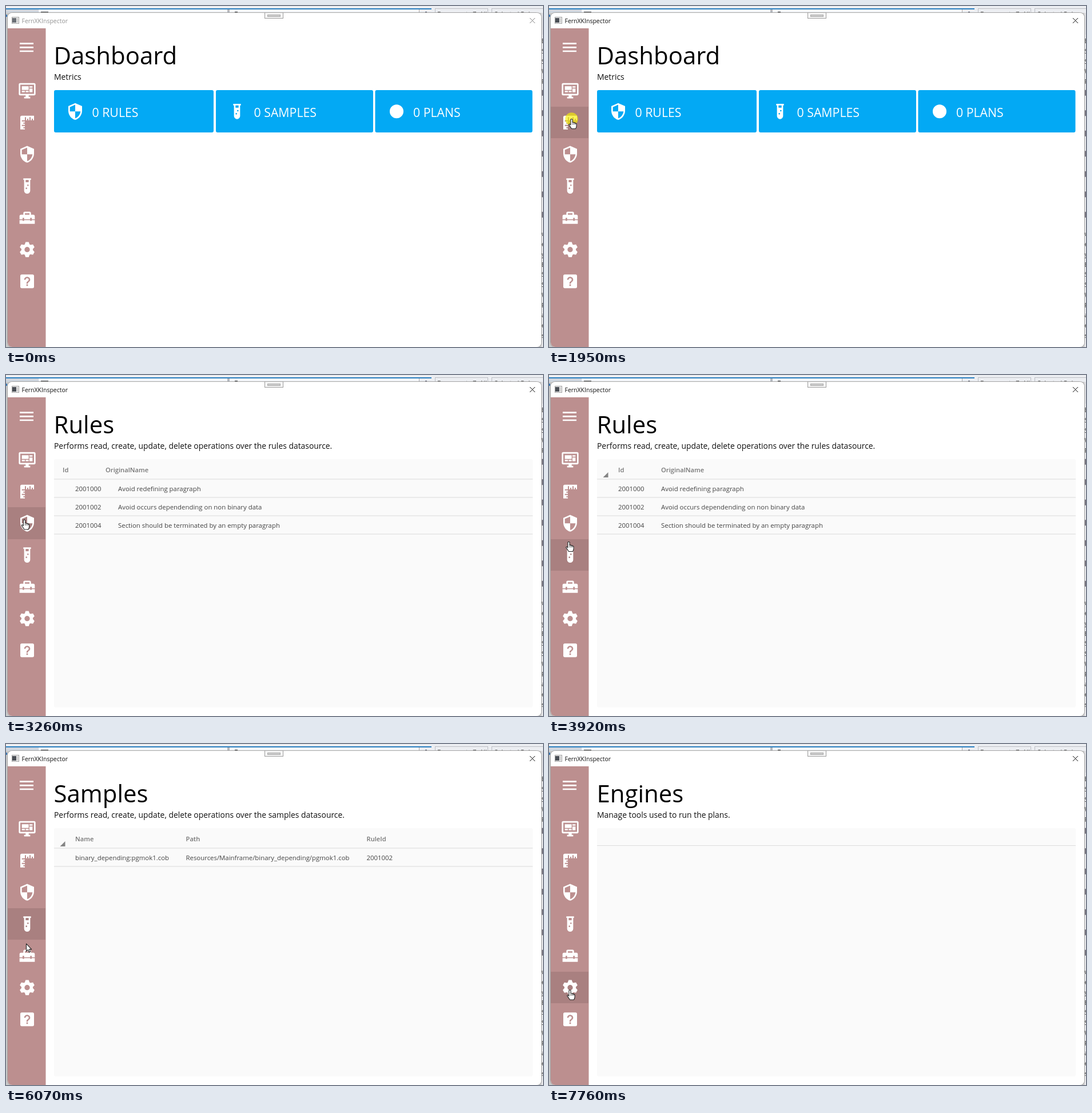
An HTML page with a canvas that plays this animation: 939x596 px, repeating every 8 s.

```html
<!DOCTYPE html>
<html lang="en">
<head>
<meta charset="utf-8">
<title>Dashboard</title>
<style>
html, body { margin: 0; width: 100%; height: 100%; overflow: hidden; background: #fff; }
canvas { display: block; width: 939px; height: 596px; }
</style>
</head>
<body>
<canvas id="stage" width="939" height="596"></canvas>
<script>
const ctx = document.getElementById('stage').getContext('2d');
const LOOP = 8000;
const STEP = 72.4;
const FONT = '"Open Sans", "Noto Sans", sans-serif';
const ROSE = '#bc8f8f', BLUE = '#03a9f4';

// Icons on a 24-unit grid, filled even-odd
const icon = {
  menu: new Path2D('M3,6H21V8H3ZM3,11H21V13H3ZM3,16H21V18H3Z'),
  monitor: new Path2D('M21,16V4H3V16H21M21,2A2,2 0 0,1 23,4V16A2,2 0 0,1 21,18H14V20H16V22H8V20H10V18H3A2,2 0 0,1 1,16V4A2,2 0 0,1 3,2H21M5,6H14V11H5ZM15,6H19V8H15ZM15,9H19V14H15ZM5,12H9V14H5ZM10,12H14V14H10Z'),
  ruler: new Path2D('M3,5V21H9V19.5H7V18H9V16.5H5V15H9V13.5H7V12H9V10.5H5V9H9V5H10.5V9H12V7H13.5V9H15V5H16.5V9H18V7H19.5V9H21V3H5A2,2 0 0,0 3,5'),
  shield: new Path2D('M12,12H19C18.47,16.11 15.72,19.78 12,20.92V12H5V6.3L12,3.19M12,1L3,5V11C3,16.55 6.84,21.73 12,23C17.16,21.73 21,16.55 21,11V5Z'),
  tube: new Path2D('M7,2V4H8V18A4,4 0 0,0 16,18V4H17V2ZM10,15A1,1 0 0,1 12,15A1,1 0 0,1 10,15M12,11A1,1 0 0,1 14,11A1,1 0 0,1 12,11M14,7H10V4H14Z'),
  toolbox: new Path2D('M18,16H16V15H8V16H6V15H2V20H22V15H18ZM20,8H17V6A2,2 0 0,0 15,4H9A2,2 0 0,0 7,6V8H4A2,2 0 0,0 2,10V14H6V12H8V14H16V12H18V14H22V10A2,2 0 0,0 20,8M15,8H9V6H15Z'),
  gear: gearPath(),
  help: new Path2D('M11,18H13V16H11ZM12,6A4,4 0 0,0 8,10H10A2,2 0 0,1 14,10C14,12 11,11.75 11,15H13C13,12.75 16,12.5 16,10A4,4 0 0,0 12,6M5,3H19A2,2 0 0,1 21,5V19A2,2 0 0,1 19,21H5A2,2 0 0,1 3,19V5A2,2 0 0,1 5,3'),
  dot: new Path2D('M3,12A9,9 0 0,1 21,12A9,9 0 0,1 3,12Z')
};
const handPath = new Path2D('M-1.6,1Q0,-1 1.6,1V6Q3.2,5.2 4.2,6.6Q5.6,6 6.6,7.4Q8.6,7.2 8.6,9.2V12Q8.6,14.5 7,17H0Q-2,13.5 -4.4,10.6Q-5,8.4 -3,9L-1.6,10.4Z');
const arrowPath = new Path2D('M0,0V13.2L3,10.5L5,15L7.2,14L5.2,9.8H9.2Z');

const MENU = ['monitor', 'ruler', 'shield', 'tube', 'toolbox', 'gear', 'help'];
const itemTop = i => Math.round(120.4 + 55.45 * i);

// time, x, y of the pointer's hot spot
const PATH = [
  [70, 858, 584], [240, 640, 505], [430, 379, 388], [500, 323, 357], [860, 80, 225],
  [1150, 50, 208], [1235, 50, 208], [1590, 40, 199], [1680, 40, 199], [1730, 39.5, 197.5],
  [2250, 39.5, 197.5], [2750, 32, 253], [3550, 32, 253], [4130, 36, 315],
  [5650, 36, 315], [6081, 35.5, 349], [6290, 31, 378], [6375, 31, 378], [6660, 39.5, 370],
  [7170, 39.5, 370], [7600, 27, 434], [7745, 36.5, 430]
];
const HOVER = [[990, 1], [2500, 2], [3800, 3], [6110, 4], [7400, 5]];
const PAGES = [[0, dashboard], [2010, plans], [3170, () => rules(false)], [3320, () => rules(true)],
  [5270, () => samples(false)], [5340, () => samples(true)], [7010, engines]];
const PRESSES = [1880, 2960, 5060, 6880], PRESS_TIME = 145;
const RIPPLES = [[2020, 1], [3335, 2], [5440, 3], [6995, 4]], RIPPLE_TIME = 135;

function gearPath() {
  const p = new Path2D();
  const corners = [[-25, 7.5], [-11.5, 10.15], [11.5, 10.15], [25, 7.5]];
  for (let k = 0; k < 6; k++) {
    for (const [deg, r] of corners) {
      const a = (deg + 60 * k) * Math.PI / 180;
      p.lineTo(12 + r * Math.sin(a), 12 - r * Math.cos(a));
    }
  }
  p.closePath();
  p.moveTo(15.5, 12);
  p.arc(12, 12, 3.5, 0, 7);
  return p;
}

const latest = (list, t) => list.filter(e => e[0] <= t).pop();

function rect(x, y, w, h, color) {
  ctx.fillStyle = color;
  ctx.fillRect(x, y, w, h);
}

function rounded(x, y, w, h, r, color) {
  ctx.fillStyle = color;
  ctx.beginPath();
  ctx.roundRect(x, y, w, h, r);
  ctx.fill();
}

function text(s, x, y, size, color, weight = 400) {
  ctx.font = `${weight} ${size}px ${FONT}`;
  ctx.fillStyle = color;
  ctx.fillText(s, x, y);
}

function drawIcon(name, cx, cy) {
  ctx.save();
  ctx.translate(cx - 16, cy - 16);
  ctx.scale(4 / 3, 4 / 3);
  ctx.fillStyle = '#fff';
  ctx.fill(icon[name], 'evenodd');
  ctx.restore();
}

function desktop() {
  rect(0, 0, 939, 596, '#c9c9c9');
  rect(0, 0, 939, 12, '#eceef2');
  rect(0, 4, 744, 2, '#2b7fc0');
  rect(0, 6, 57, 6, '#cfd6df');
  rect(58, 6, 329, 6, '#f5f6f8');
  rect(61, 10, 13, 2, '#444');
  rect(387, 6, 4, 6, '#b4b8be');
  rect(391, 6, 331, 6, '#f5f6f8');
  rect(400, 10, 5, 2, '#333');
  rect(722, 6, 1, 6, '#aaa');
  rect(733, 10, 3, 2, '#556');
  ctx.strokeStyle = '#bcbec4';
  ctx.lineWidth = 1;
  ctx.strokeRect(750.5, 4.5, 92, 20);
  ctx.strokeRect(849.5, 4.5, 100, 20);
  text('Document   7  All', 754, 18, 11, '#444');
  text('Selected Rules', 854, 18, 11, '#444');
  rect(0, 15, 2, 4, '#3b78b5');
  rect(936, 12, 3, 584, '#dedee2');
  rect(938, 50, 1, 546, '#f4f4f4');
  for (let i = 0; i < 30; i++) {
    const y = 65 + i * 17.75;
    if (y < 140 || y > 390) text('ESSWPaeswey'[i % 11], 936.5, y, 11, '#333');
    else if (i % 2) rect(937, y - 7, 2, 10, '#77747f');
  }
}

function chrome(active) {
  ctx.strokeStyle = '#a4a4a4';
  ctx.lineWidth = 1;
  ctx.beginPath();
  ctx.roundRect(2.5, 11.5, 934, 585, 8);
  ctx.stroke();
  rounded(3, 12, 933, 584, 8, '#fff');
  rounded(3, 39, 66.5, 557, [0, 0, 0, 8], ROSE);

  rect(10, 19, 13, 12, '#a0a0a0');
  rect(11, 20, 11, 10, '#f4f4f4');
  rect(11, 21, 7, 8, active ? '#4a4f55' : '#6b7076');
  rect(19, 21, 2, 8, '#c8c8c8');
  text('FernXKInspector', 27.5, 29.5, 10.5, active ? '#111' : '#929292');

  ctx.strokeStyle = active ? '#111' : '#858585';
  ctx.beginPath();
  ctx.moveTo(916, 21); ctx.lineTo(925, 30);
  ctx.moveTo(925, 21); ctx.lineTo(916, 30);
  ctx.stroke();

  rect(452, 11, 33, 11, '#9c9c9c');
  rect(453, 12, 31, 9, '#f7f7f7');
  rect(457, 15, 23, 4, '#a8a8a8');
  rect(458, 16, 21, 2, '#cfcfcf');
}

function heading(title, subtitle) {
  text(title, 83.5, 102, 41.9, '#000');
  text(subtitle, 84, 129, 13.9, '#111');
}

function dashboard() {
  heading('Dashboard', 'Metrics');
  const cards = [
    [84, 279, 'shield', 121, '0 RULES', 150.5],
    [367, 275, 'tube', 404, '0 SAMPLES', 433.5],
    [645.5, 275, 'dot', 683, '0 PLANS', 712]
  ];
  for (const [x, w, name, iconX, label, labelX] of cards) {
    rounded(x, 147, w, 74, 3, BLUE);
    drawIcon(name, iconX, 184.3);
    text(label, labelX, 194, 21.3, '#fff');
  }
}

function panel(lines) {
  rounded(84, 147, 837, 434, 3, '#fafafa');
  for (const y of lines) rect(84, y, 837, 1, '#dcdcdc');
}

// Column heads sit 22px to the left until the row-header gutter is laid out
function table(columns, rows, ready) {
  panel([181.5, ...rows.map((_, i) => 213.5 + 32 * i)]);
  columns.forEach(([x, label], c) => {
    text(label, x - (ready ? 0 : 22), 169.5, 11.2, '#757575', 600);
    rows.forEach((row, i) => text(row[c], x, 203.3 + 32 * i, 11.4, '#444'));
  });
  if (!ready) return;
  ctx.fillStyle = '#858585';
  ctx.beginPath();
  ctx.moveTo(103.5, 170);
  ctx.lineTo(103.5, 179);
  ctx.lineTo(94.5, 179);
  ctx.fill();
}

const operations = name => `Performs read, create, update, delete operations over the ${name} datasource.`;

function plans() {
  heading('Plans', operations('plans'));
  panel([177]);
}

function rules(ready) {
  heading('Rules', operations('rules'));
  table([[121, 'Id'], [196, 'OriginalName']], [
    ['2001000', 'Avoid redefining paragraph'],
    ['2001002', 'Avoid occurs dependending on non binary data'],
    ['2001004', 'Section should be terminated by an empty paragraph']
  ], ready);
}

function samples(ready) {
  heading('Samples', operations('samples'));
  table([[121, 'Name'], [314.5, 'Path'], [630.5, 'RuleId']], [
    ['binary_depending:pgmok1.cob', 'Resources/Mainframe/binary_depending/pgmok1.cob', '2001002']
  ], ready);
}

function engines() {
  heading('Engines', 'Manage tools used to run the plans.');
  panel([177]);
}

function itemRect(i, color) {
  rect(3, itemTop(i), 66, itemTop(i + 1) - itemTop(i), color);
}

function ripple(t) {
  const hit = latest(RIPPLES, t);
  if (!hit || t - hit[0] >= RIPPLE_TIME) return;
  const [start, item] = hit;
  const [x, y] = pointer(start);
  const rx = 46 * Math.sqrt((t - start) / 190);
  ctx.save();
  ctx.beginPath();
  ctx.rect(3, itemTop(item), 66, itemTop(item + 1) - itemTop(item));
  ctx.clip();
  itemRect(item, '#806262');
  ctx.fillStyle = '#7a5676';
  ctx.beginPath();
  ctx.ellipse(x, y, rx, rx * 1.55, 0, 0, 7);
  ctx.fill();
  ctx.restore();
}

function sidebar(t) {
  const hover = latest(HOVER, t);
  if (hover) itemRect(hover[1], '#a98080');
  ripple(t);
  drawIcon('menu', 36, 72.3);
  MENU.forEach((name, i) => drawIcon(name, 37, 148.2 + 55.5 * i));
}

function pointer(t) {
  const next = PATH.findIndex(k => k[0] > t);
  if (next < 0) return PATH[PATH.length - 1].slice(1);
  const [t0, x0, y0] = PATH[next - 1], [t1, x1, y1] = PATH[next];
  const u = (t - t0) / (t1 - t0);
  return [x0 + (x1 - x0) * u, y0 + (y1 - y0) * u];
}

function cursor(t) {
  if (t < PATH[0][0]) return;
  const [x, y] = pointer(t);
  if (PRESSES.some(from => t >= from && t < from + PRESS_TIME)) {
    ctx.fillStyle = 'rgba(248,240,0,.65)';
    ctx.beginPath();
    ctx.arc(x, y, 11.2, 0, 7);
    ctx.fill();
  }
  const isArrow = t < 990 || (t > 5990 && t < 6120);
  const shape = isArrow ? arrowPath : handPath;
  ctx.save();
  ctx.translate(x, y);
  ctx.fillStyle = '#fff';
  ctx.fill(shape);
  ctx.strokeStyle = '#222';
  ctx.lineWidth = 1.1;
  ctx.lineJoin = 'round';
  ctx.stroke(shape);
  if (!isArrow) {
    ctx.lineWidth = 0.8;
    ctx.beginPath();
    for (const dx of [1.6, 4.1, 6.5]) {
      ctx.moveTo(dx, 6.8);
      ctx.lineTo(dx, 10);
    }
    ctx.stroke();
  }
  ctx.restore();
}

function draw() {
  const t = Math.floor((performance.now() % LOOP + 20) / STEP) * STEP;
  desktop();
  chrome(t >= 1900);
  latest(PAGES, t)[1]();
  sidebar(t);
  cursor(t);
  requestAnimationFrame(draw);
}
draw();
</script>
</body>
</html>
```
